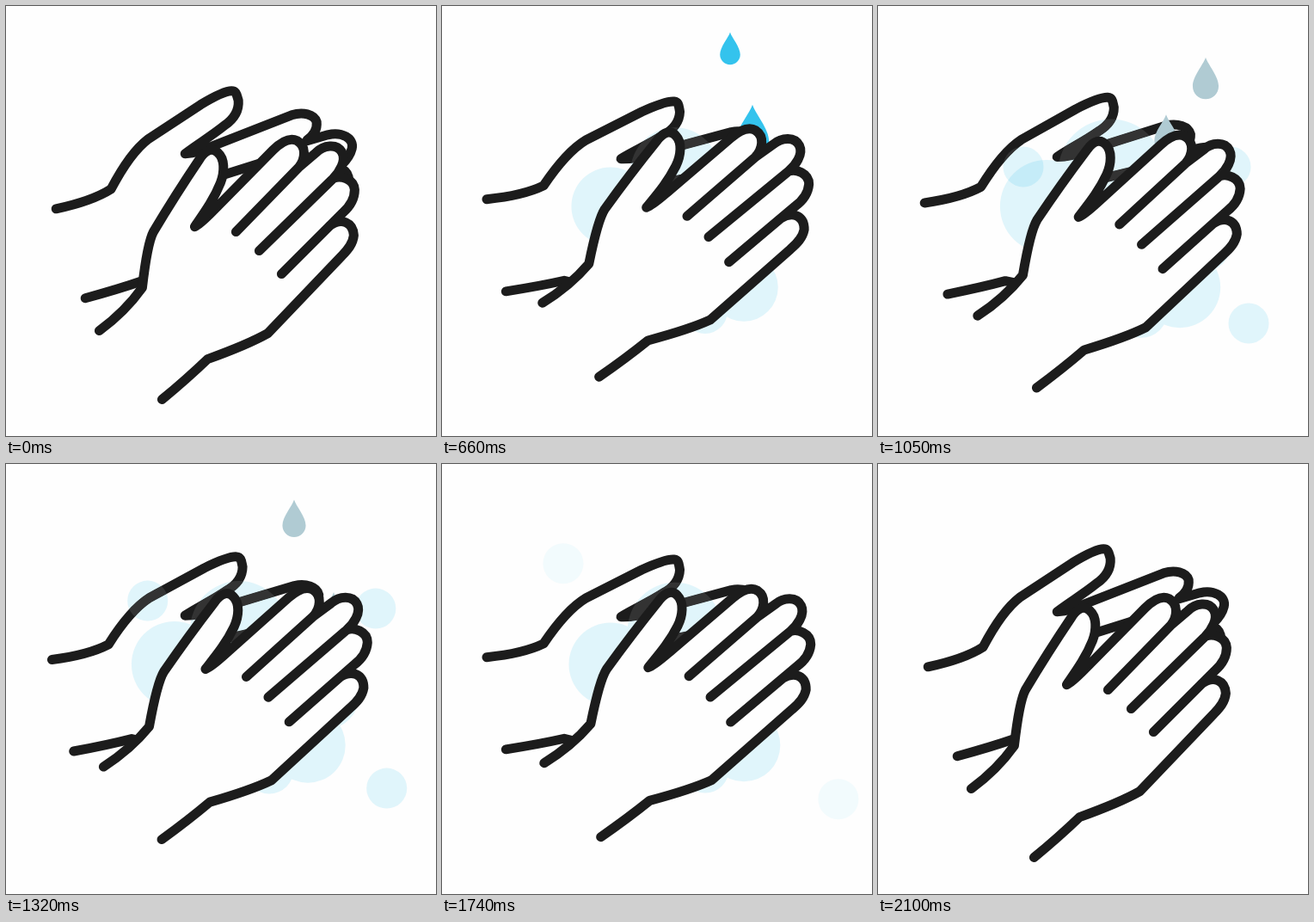
Write an HTML page with a canvas that moves like this. It is 500 px wide and 500 px high and loops after 2.13 s.

```html
<!DOCTYPE html>
<html lang="en">
<head>
<meta charset="utf-8">
<title>Washing hands</title>
<style>
html, body { margin: 0; width: 100%; height: 100%; overflow: hidden; background: #fefefe; }
canvas { display: block; width: 500px; height: 500px; }
</style>
</head>
<body>
<canvas id="stage" width="500" height="500"></canvas>
<script>
const ctx = document.getElementById('stage').getContext('2d');
const LOOP = 2130, HOLD = 330, STEP = 30, LAST = 60;
const INK = '#1c1c1c', PAPER = '#fefefe';
const FOAM = 'rgb(225,246,252)', FOAM_ON_INK = '#333';
const BLUE = [52, 195, 237], GREY = [176, 203, 211];

const backHand = new Path2D(
  'M58 235Q100 226 122 212Q144 170 165 154L226 114C246 102 256 98 262 98' +
  'C268 98 268 103 270 109C271 122 264 131 254 138C238 151 222 160 208 171' +
  'C220 170 230 167 240 162L332 126C345 122 358 125 361 134C362 144 357 150 350 155' +
  'M245 198L302 180L325 172' +
  'M350 156L374 149C390 145 405 153 402 165C400 173 396 178 390 184' +
  'M388 188Q396 190 398 198' +
  'M92 339Q132 328 158 319L180 322');

const palm = 'M108 377Q138 355 158 327Q164 275 171 262Q196 220 225 177' +
  'C232 166 240 164 246 170C254 177 254 192 249 205C241 225 230 240 219 256' +
  'C226 253 235 243 245 233L310 167C320 157 330 152 338 156C349 162 348 177 340 187';
const middle = 'L360 170C369 161 384 159 390 169C396 179 387 193 380 200';
const ring = 'C388 196 404 200 405 213C405 226 398 234 391 240';
const pinky = 'L376 255C390 245 403 251 404 266C403 276 397 283 390 290' +
  'L304 380Q281 393 234 410Q210 433 181 457';
const frontFill = new Path2D(palm + middle + ring + pinky + 'Z');
const frontLine = new Path2D(palm + 'L267 262M340 187' + middle + 'L294 284M380 200' +
  ring + 'L320 311M376 255' + pinky);

const dropShape = new Path2D(
  'M0 -29C3 -19 18 -3 18 11C18 21 10 29 0 29C-10 29 -18 21 -18 11C-18 -3 -3 -19 0 -29Z');

const drops = [
  { x: 361, y: 43, born: 0, speed: 8.55, size: 62 },
  { x: 335, y: 22, born: 8.4, speed: 7.6, size: 44 },
  { x: 381, y: 20, born: 18.6, speed: 10, size: 50 },
  { x: 335, y: 22, born: 29.2, speed: 8.6, size: 47 }
];

const foam = [
  { x: 196, y: 233, r: 51 },
  { x: 271, y: 193, r: 58 },
  { x: 351, y: 327, r: 44.5 },
  { x: 306, y: 355, r: 29 },
  { x: 372, y: 270, r: 39 }
];

// position at step 25, speed per step, sideways bend, step of vanishing
const floaters = [
  { x: 169, y: 187, vx: 0, vy: -3.1, bend: -.053, end: 53 },
  { x: 410, y: 187, vx: 2.2, vy: -2.1, bend: 0, end: 46 },
  { x: 431, y: 369, vx: 1.3, vy: .9, bend: 0, end: 53 }
];

const clamp = v => Math.max(0, Math.min(1, v));
const ease = v => (v = clamp(v)) * v * (3 - 2 * v);

function turned(px, py, dx, dy, deg, draw) {
  ctx.save();
  ctx.translate(px + dx, py + dy);
  ctx.rotate(deg * Math.PI / 180);
  ctx.translate(-px, -py);
  draw();
  ctx.restore();
}

// tints the paper and lifts the ink below
function fillFoam(circles, alpha) {
  ctx.save();
  ctx.globalAlpha = alpha;
  ctx.beginPath();
  for (const [x, y, r] of circles) {
    ctx.moveTo(x + r, y);
    ctx.arc(x, y, r, 0, 7);
  }
  ctx.globalCompositeOperation = 'multiply';
  ctx.fillStyle = FOAM;
  ctx.fill();
  ctx.globalCompositeOperation = 'lighten';
  ctx.fillStyle = FOAM_ON_INK;
  ctx.fill();
  ctx.restore();
}

function drawFoam(k) {
  const swell = ease(k / 14) * ease((LAST - k) / 14) *
    (1 + .06 * Math.cos((k - 25) / 30 * 2 * Math.PI));
  fillFoam(foam.map(b => [b.x, b.y, b.r * swell]), 1);
  const age = k - 25;
  for (const f of floaters) {
    const x = f.x + f.vx * age + f.bend * age * age;
    fillFoam([[x, f.y + f.vy * age, 23.5 * ease((k - 13) / 10)]], clamp((f.end - k) / 12));
  }
}

function drawDrops(k) {
  const fade = clamp((k - 14) / 11);
  ctx.fillStyle = 'rgb(' + BLUE.map((v, i) => Math.round(v + (GREY[i] - v) * fade)) + ')';
  for (const d of drops) {
    const age = k - d.born, y = d.y + d.speed * age;
    if (age <= 0 || y > 190) continue;
    const scale = d.size / 58 * (1 - Math.exp(-.55 * age));
    ctx.save();
    ctx.translate(d.x, y);
    ctx.scale(scale, scale);
    ctx.fill(dropShape);
    ctx.restore();
  }
}

function render(k) {
  ctx.fillStyle = PAPER;
  ctx.fillRect(0, 0, 500, 500);
  ctx.strokeStyle = INK;
  ctx.lineWidth = 11;
  ctx.lineCap = ctx.lineJoin = 'round';

  // each rub takes ten steps out and ten back, bowing off the straight path
  const cycle = Math.floor(k / 20), phase = k % 20;
  const rub = 1 - Math.abs(phase - 10) / 10;
  const bow = 4 * rub * (1 - rub) * (phase < 10 ? 6.4 / (1 + 2 * cycle) : -3.7);

  turned(155, 173, .2, .8, 7.9 * rub, () => ctx.stroke(backHand));
  drawFoam(k);
  drawDrops(k);
  turned(267, 262, .4 + 23.9 * rub + .65 * bow, .6 - 20.6 * rub + .76 * bow, 6.15 * rub, () => {
    ctx.fillStyle = PAPER;
    ctx.fill(frontFill);
    ctx.stroke(frontLine);
  });
}

const start = performance.now();
function tick() {
  const t = Math.max(0, performance.now() - start) % LOOP;
  render(t < HOLD ? 0 : Math.min(LAST, Math.floor((t - HOLD) / STEP) + 1));
  requestAnimationFrame(tick);
}
tick();
</script>
</body>
</html>
```
